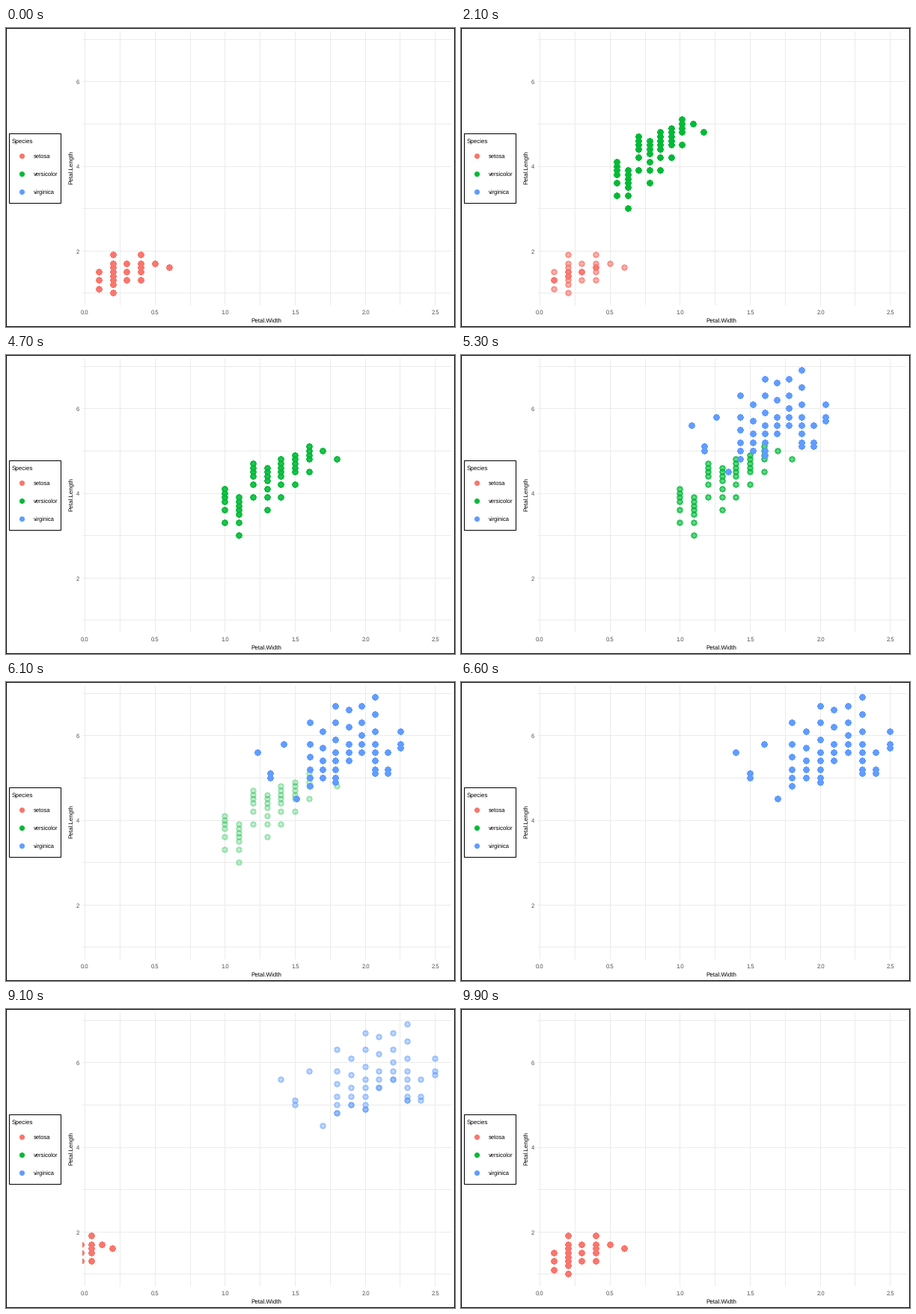
Animation, 600 px wide and 400 px high, one loop 10 s. Source, as a matplotlib script:

```python
import numpy as np
import matplotlib.pyplot as plt
from matplotlib.animation import FuncAnimation
from matplotlib.patches import Rectangle

W, H, DPI = 600, 400, 100
FRAMES, STEP = 100, 100
PX = 72 / DPI                      # one pixel in points
FLY_FROM = -1.0                    # x value where a group starts its entry
LEFT, RIGHT, TOP, BOTTOM = 102, 595, 5, 371

plt.rcParams["font.family"] = "Liberation Sans"
plt.rcParams["text.hinting"] = "none"


def snap(v):
    """Centre of the nearest whole pixel."""
    return np.floor(v + 0.5) + 0.5


def px_x(v):
    return snap(105.2 + 187.2 * v)


def px_y(v):
    return snap(411.13 - 56.65 * v)


def bounce_out(p):
    if p < 4 / 11:
        return 121 * p * p / 16
    if p < 8 / 11:
        return 363 / 40 * p * p - 9.9 * p + 3.4
    if p < 0.9:
        return 4356 / 361 * p * p - 35442 / 1805 * p + 16061 / 1805
    return 10.8 * p * p - 20.52 * p + 10.72


def progress(i, span):
    return min(max((i - span[0]) / (span[1] - span[0]), 0), 1)


# how the points crowd inside a column, for t from 0 (bottom) to 1 (top)
def crowd_middle(t):
    return (1 + (2 * t - 1) ** 3) / 2


def crowd_top(t):
    return t ** 0.6


def crowd_bottom(t):
    return t ** 2


def cloud(first, low, high, density, crowd):
    """Columns 0.1 apart, each filled between its low and high edge."""
    points = []
    for k, (lo, hi) in enumerate(zip(low, high)):
        n = 1 + int(np.ceil((hi - lo) * density))
        rows = np.round(lo + (hi - lo) * crowd(np.linspace(0, 1, n)))
        points += [((first + k) / 10, r / 10) for r in rows]
    return np.array(points).T


fig = plt.figure(figsize=(W / DPI, H / DPI), dpi=DPI, facecolor="white")
ax = fig.add_axes([0, 0, 1, 1])
ax.set_xlim(0, W)
ax.set_ylim(H, 0)
ax.axis("off")


def box(x0, y0, x1, y1):
    ax.add_patch(Rectangle((x0, y0), x1 - x0, y1 - y0, fill=False,
                           ec="black", lw=PX, snap=False, clip_on=False))


def label(x, y, text, size=7.7, color="black", ha="left", va="baseline", **kw):
    ax.text(x, y, text, fontsize=size * PX, color=color, ha=ha, va=va, **kw)


def dots(x, y, color, z=3):
    return ax.scatter(x, y, s=(6.1 * PX) ** 2, lw=PX, color=[color] * len(x),
                      antialiased=False, zorder=z)


# grid
GRID = dict(color="#EBEBEB", lw=PX, snap=False, zorder=1, solid_capstyle="butt")
for v in np.arange(0, 2.6, 0.25):
    ax.plot([px_x(v)] * 2, [TOP, BOTTOM], **GRID)
for v in range(1, 8):
    ax.plot([LEFT, RIGHT], [px_y(v)] * 2, **GRID)

# axes text
TICK = "#4D4D4D"
for v in np.arange(0, 2.6, 0.5):
    label(px_x(v), 382.5, f"{v:.1f}", color=TICK, ha="center")
for v in (2, 4, 6):
    label(98, px_y(v) + 3, str(v), color=TICK, ha="right")
label(348, 394, "Petal.Width", 8, ha="center")
label(88, 187, "Petal.Length", 8, ha="center", va="center", rotation=90)

# frame and legend
box(0.5, 0.5, W - 0.5, H - 0.5)
box(4.5, 141.5, 73.5, 234.5)
label(8, 154, "Species", 8)


class Group:
    def __init__(self, name, color, points, enter, leave, seen, order):
        self.x, self.y = points
        self.enter, self.leave, self.seen = enter, leave, seen
        self.art = dots(self.x, self.y, color, 3 + order)
        self.art.set_clip_path(Rectangle((LEFT, TOP), RIGHT - LEFT, BOTTOM - TOP,
                                         transform=ax.transData))
        key_y = 170.5 + 24 * order
        dots([20.5], [key_y], color)
        label(37, key_y + 3.5, name)

    def update(self, i):
        entering = self.seen <= i <= self.enter[1]
        leaving = self.leave[0] <= i < self.leave[1]
        if self.enter[1] < self.leave[0]:
            resting = self.enter[1] < i < self.leave[0]
        else:
            resting = i < self.leave[0] or i > self.enter[1]
        self.art.set_visible(entering or leaving or resting)
        far = 1 - bounce_out(progress(i, self.enter)) if entering else 0
        # the fade shows only from its third step on
        fade = leaving and i - self.leave[0] >= 3
        self.art.set_alpha(1 - progress(i, self.leave) if fade else 1)
        x = self.x - far * (self.x - FLY_FROM)
        self.art.set_offsets(np.column_stack([px_x(x), px_y(self.y)]))


# column edges in tenths, from the first column on
setosa = cloud(1, [11, 10, 13, 13, 17, 16], [15, 19, 17, 19, 17, 16],
               1.2, crowd_middle)
versicolor = cloud(10, [33, 30, 39, 36, 39, 42, 45, 50, 48],
                   [41, 39, 47, 46, 48, 49, 51, 50, 48], 0.6, crowd_top)
virginica = cloud(14, [56, 50, 58, 45, 48, 50, 49, 54, 56, 51, 51, 57],
                  [56, 51, 58, 45, 63, 61, 67, 66, 67, 69, 56, 61],
                  0.4, crowd_bottom)

A, B, C = (11, 33), (44, 66), (78, 99)
groups = [
    Group("setosa", "#F8766D", setosa, C, A, 84, 0),
    Group("versicolor", "#00BA38", versicolor, A, B, 16, 1),
    Group("virginica", "#619CFF", virginica, B, C, 50, 2),
]


def draw(i):
    for g in groups:
        g.update(i)
    return [g.art for g in groups]


anim = FuncAnimation(fig, draw, frames=FRAMES, interval=STEP,
                     init_func=lambda: draw(0), repeat=True, repeat_delay=0)
plt.show()
```
